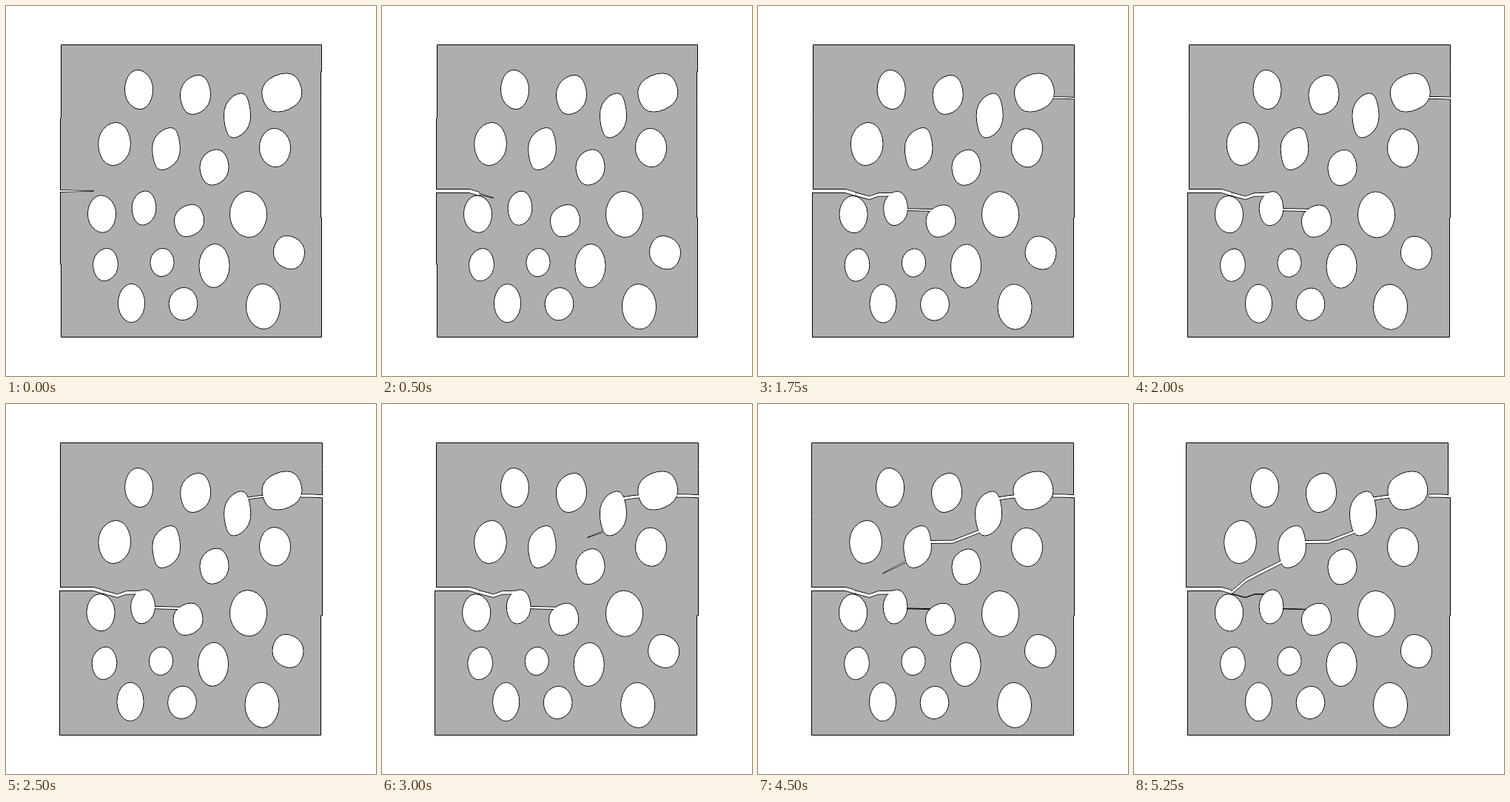
An HTML page with a canvas that plays this animation: 500 px wide and 500 px high, repeating every 5500 ms.

```html
<!DOCTYPE html>
<html>
<head>
<meta charset="utf-8">
<title>Crack growth in a porous plate</title>
<style>
html, body { margin: 0; width: 100%; height: 100%; overflow: hidden; background: #fff; }
canvas { display: block; }
</style>
</head>
<body>
<canvas id="stage" width="500" height="500"></canvas>
<script>
const ctx = document.getElementById('stage').getContext('2d');
const STEP = 250, STEPS = 22;

// Pores of each part of the plate: cx, cy, rx, ry, lean of the top to the left
const PORES = {
  upper: [
    [179, 112.5, 19, 26.5, 1.5], [255.5, 119.5, 20.5, 26.5, -4], [372.3, 116.5, 27, 26, -6],
    [312, 147.5, 18, 30, -5], [146, 186, 21.8, 29, -2], [216, 192.5, 18.8, 28.5, -6]
  ],
  middle: [[281, 217.5, 19.5, 24, -3], [363, 191, 21, 26, 1], [327, 281, 25, 31, 1]],
  lower: [
    [129, 280.5, 19, 25, 1], [186, 272.5, 16.3, 23, -2], [247, 289.5, 20, 21.7, -4],
    [134, 349, 16.8, 22, -2], [210.5, 346, 16, 19, -1], [281, 350.5, 20.5, 29.5, -1],
    [382, 332.5, 21, 22.5, 3], [169, 401, 18, 26, 0], [239, 402, 19.3, 22, -1],
    [347, 405.5, 23, 30.5, 1]
  ]
};

// Crack paths as x, y, step at which the tip arrives; `shut` is when one closes again
const CRACKS = [
  { half: 2.5, path: [[60, 249.5, -2], [118, 249.5, 0], [131, 253.6, .8]] },
  { half: 2.2, path: [[131, 253.6, .8], [150, 258.8, 2], [162, 254.5, 3], [183, 254, 4]], shut: [20, 21] },
  { half: 1.6, path: [[196, 274.5, 4], [240, 275.6, 6]], shut: [12, 20] },
  { half: 2, path: [[398, 123.5, 6], [412, 123.5, 6.4], [440, 124.8, 7]] },
  { half: 2, path: [[350, 124, 8], [337, 125.4, 9], [320, 128, 10]] },
  { half: 1.9, path: [[302, 170.5, 11], [277, 180, 12], [263, 185.6, 13], [230, 186, 14]] },
  { half: 2.2, path: [[204, 210.5, 17], [168, 228.5, 18], [151, 237.5, 19], [131, 254.5, 21]] }
];

const ramp = (n, a, b) => Math.min(1, Math.max(0, (n - a) / (b - a)));

// The plate stretches when the right edge breaks; the parts then drift apart.
function drift(n) {
  const broken = n >= 7;
  return {
    stretch: broken ? .75 : 0,
    bow: broken ? 0 : .6,
    upper: [broken ? .5 - (n - 8) / 7 - 1.6 * ramp(n, 20, 21) : 0, 0],
    middle: [0, 2 * ramp(n, 6, 13)],
    lower: [-ramp(n, 6, 8) - Math.max(0, 1 - Math.abs(n - 11.5) / 3), ramp(n, 0, 12)]
  };
}

// An almost upright edge: whole pixels with one step halfway.
function edge(x0, y0, x1, y1) {
  const a = Math.round(x0), b = Math.round(x1), mid = (y0 + y1) / 2;
  return [[a, y0], [a, mid], [b, mid], [b, y1]];
}

function plateShape({ stretch, bow, upper, lower }) {
  const left = 74 - stretch, right = 426 + stretch, [u] = upper, [l] = lower;
  return [
    ...edge(right + u, 52, right + u - bow, 124),
    ...edge(right - bow, 124, right + l, 447),
    ...edge(left + l, 447, left + l - bow, 250),
    ...edge(left + u - bow, 250, left + u, 52)
  ];
}

function poreShape([cx, cy, rx, ry, lean], [dx, dy], inset) {
  return Array.from({ length: 24 }, (_, j) => {
    const a = j * Math.PI / 12, s = Math.sin(a);
    return [cx + dx + (rx - inset) * Math.cos(a) + lean * s ** 3, cy + dy + (ry - inset) * s];
  });
}

function crackShape({ half, path, shut }, n, inset) {
  const start = path[0][2];
  if (n < start) return [];
  const line = path.filter(p => p[2] <= n);
  const next = path[line.length];
  if (next) {
    const [x, y, t] = line[line.length - 1], k = ramp(n, t, next[2]);
    line.push([x + (next[0] - x) * k, y + (next[1] - y) * k]);
  }
  const tip = line[line.length - 1];
  const full = half * ramp(n, start - 3, start + 4);
  const open = shut ? full * (1 - ramp(n, ...shut)) : full;
  const up = [], down = [];
  for (const [x, y] of line) {
    const taper = next ? Math.min(1, Math.hypot(x - tip[0], y - tip[1]) / 30) : 1;
    const h = Math.max(0, open * taper - inset);
    const base = y + full - open;   // closes onto its lower flank
    up.push([x, base - h]);
    down.unshift([x, base + h]);
  }
  return up.concat(down);
}

function trace(points) {
  ctx.beginPath();
  points.forEach(p => ctx.lineTo(...p));
  ctx.closePath();
}

function draw(n) {
  const move = drift(n);
  const cuts = inset => [
    ...CRACKS.map(c => crackShape(c, n, inset)),
    ...Object.keys(PORES).flatMap(part => PORES[part].map(p => poreShape(p, move[part], inset)))
  ];
  ctx.setTransform(1, 0, 0, 1, 0, 0);
  ctx.fillStyle = '#fff';
  ctx.fillRect(0, 0, 500, 500);
  ctx.translate(.5, .5);
  ctx.lineJoin = 'bevel';

  trace(plateShape(move));
  ctx.fillStyle = '#aeaeae';
  ctx.fill();
  ctx.stroke();

  // Outlines first, then white interiors, so touching cuts merge.
  ctx.save();
  ctx.clip();
  cuts(0).forEach(s => { trace(s); ctx.stroke(); });
  ctx.restore();
  ctx.fillStyle = '#fff';
  cuts(.5).forEach(s => { trace(s); ctx.fill(); });
}

let shown = -1;
function tick() {
  const n = Math.floor(performance.now() / STEP) % STEPS;
  if (n !== shown) draw(shown = n);
  requestAnimationFrame(tick);
}
tick();
</script>
</body>
</html>
```
